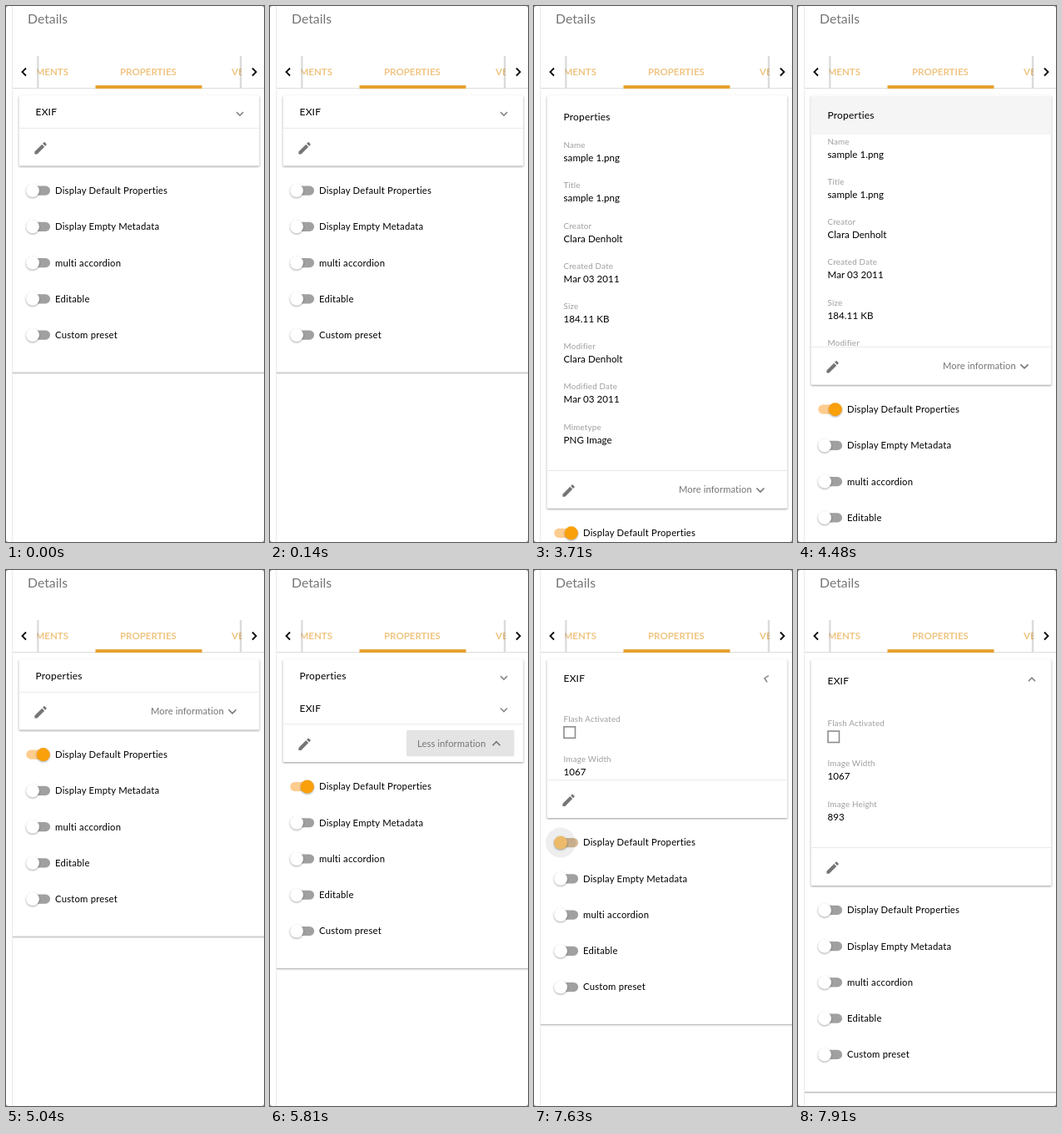
An HTML page for the animation above (8000 ms loop, 310 px wide and 642 px high).

```html
<!DOCTYPE html>
<html lang="en">
<head>
<meta charset="utf-8">
<title>Details panel</title>
<style>
  html, body { margin: 0; height: 100%; overflow: hidden; background: #8a8a8a; }
  svg { display: block; }
  text { font: 11.3px Lato, sans-serif; letter-spacing: .2px; fill: #000; }
  .title { font-size: 15.8px; letter-spacing: 0; fill: #757575; }
  .tab { font-weight: 700; font-size: 11.5px; letter-spacing: 0; fill: #f0c583; }
  .header { font-size: 12px; }
  .label { font-size: 9.8px; fill: #9e9e9e; }
  .value { font-size: 11.6px; letter-spacing: .05px; }
  .info { font-size: 11.2px; letter-spacing: .1px; fill: #757575; }
  .line { fill: none; stroke: #757575; stroke-width: 1.6; }
  .card { fill: #fff; filter: drop-shadow(0 1px 1.2px rgba(0,0,0,.4)); }
  .thumb { filter: drop-shadow(0 1px 1px rgba(0,0,0,.35)); }
</style>
</head>
<body>
<svg width="310" height="642" viewBox="0 0 310 642">
  <defs>
    <linearGradient id="shade"><stop stop-opacity=".22"/><stop offset="1" stop-opacity="0"/></linearGradient>
  </defs>
  <rect width="310" height="642" rx="3" fill="#fff"/>
  <path d="M7.5 0V642" stroke="#ebebeb"/>
  <text class="title" x="26" y="21">Details</text>
  <text class="tab" x="75" y="83" text-anchor="end">COMMENTS</text>
  <text class="tab" x="137" y="83">PROPERTIES</text>
  <text class="tab" x="271" y="83">VERSIONS</text>
  <rect x="8" y="60" width="29.5" height="38" fill="#fff"/>
  <rect x="283" y="60" width="27" height="38" fill="#fff"/>
  <rect x="37.5" y="60" width="3" height="38" fill="url(#shade)"/>
  <rect x="-283" y="60" width="3" height="38" fill="url(#shade)" transform="scale(-1 1)"/>
  <path d="M8 98.5H310" stroke="#dcdcdc"/>
  <rect x="107.5" y="95" width="128" height="4" fill="#e6a131"/>
  <path d="M24 74.5L19.5 79L24 83.5M296 74.5L300.5 79L296 83.5" fill="none" stroke="#000" stroke-width="1.8"/>
  <g id="scene"></g>
</svg>
<script>
const LOOP = 8000, STEP = 70, EXPAND = 225;
const TOGGLE_ON = 2845, COLLAPSE = 4413, MORE = 5740, TOGGLE_OFF = 7545;
const CARD_TOP = 107.9, HEADER = 38.4, HEADER_GROWTH = 12, ROW = 48.2;
const PENCIL = 'M3 17.25V21h3.75L17.81 9.94l-3.75-3.75zM20.71 7.04a1 1 0 0 0 0-1.41l-2.34-2.34a1 1 0 0 0-1.41 0l-1.83 1.83 3.75 3.75z';

const properties = [
  ['Name', 'sample 1.png'], ['Title', 'sample 1.png'], ['Creator', 'Clara Denholt'],
  ['Created Date', 'Mar 03 2011'], ['Size', '184.11 KB'], ['Modifier', 'Clara Denholt'],
  ['Modified Date', 'Mar 03 2011'], ['Mimetype', 'PNG Image']
];
const exif = [['Flash Activated', null], ['Image Width', '1067'], ['Image Height', '893']];
const options = ['Display Default Properties', 'Display Empty Metadata', 'multi accordion', 'Editable', 'Custom preset'];

const clamp = x => Math.min(1, Math.max(0, x));
const ramp = (t, start, length) => clamp((t - start) / length);
const mix = (a, b, k) => `rgb(${a.map((v, i) => Math.round(v + (b[i] - v) * k))})`;
const text = (kind, x, y, s) => `<text class="${kind}" x="${x}" y="${y}">${s}</text>`;

// cubic-bezier(.4, 0, .2, 1)
function ease(x) {
  let lo = 0, hi = 1;
  for (let i = 0; i < 20; i++) {
    const u = (lo + hi) / 2, v = 1 - u;
    if (1.2 * v * v * u + .6 * v * u * u + u ** 3 < x) lo = u; else hi = u;
  }
  return 3 * (1 - lo) * lo * lo + lo ** 3;
}
const expand = (t, start) => ease(ramp(t, start, EXPAND));

function field([label, value], y) {
  return text('label', 35.5, y + 3.3, label) + (value === null
    ? `<rect class="line" x="36" y="${y + 9}" width="13.5" height="13.5" style="stroke:#8c8c8c"/>`
    : text('value', 35.5, y + 19.3, value));
}

function panel({ title, rows, firstRow, open, hover, chevron }, y) {
  const header = HEADER + HEADER_GROWTH * open;
  const body = (firstRow + ROW * (rows.length - 1) + 52.2) * open;
  const middle = y + header / 2;
  let out = hover ? `<rect x="15.5" y="${y}" width="289" height="${header}" fill="#f5f5f5"/>` : '';
  out += text('header', 35.5, middle + 4, title);
  if (chevron) out += `<path class="line" style="stroke:#888" d="M-4 0L0 4L4 0" transform="translate(281 ${middle}) rotate(${180 * open})"/>`;
  if (open) out += `<svg y="${y + header}" width="310" height="${body}">${rows.map((r, i) => field(r, firstRow + ROW * i)).join('')}</svg>`;
  return { out, bottom: y + header + body };
}

function infoButton(t, y, more) {
  const left = more ? 164 : 161, width = 293.5 - left;
  const hover = t >= 5460 && t < 6230 ? .05 : 0;
  const grow = ramp(t, 5640, 220), fade = .06 * (1 - ramp(t, 5870, 200));
  let out = `<rect x="${left}" y="${y + 7}" width="${width}" height="31.5" rx="2" fill-opacity="${hover}"/>`;
  if (grow && fade) out += `<svg x="${left}" y="${y + 7}" width="${width}" height="31.5"><circle cx="65" cy="16" r="${90 * grow}" fill-opacity="${fade}"/></svg>`;
  const c = y + 23;
  return out + text('info', more ? 177 : 174, c + 3.8, more ? 'Less information' : 'More information')
    + `<path class="line" d="${more ? `M267.5 ${c + 2.5}l4.5 -4.5 4.5 4.5` : `M267.5 ${c - 2}l4.5 4.5 4.5 -4.5`}"/>`;
}

function toggle(y, label, shift, tint) {
  return `<rect x="24.3" y="${y - 5.6}" width="28.8" height="11.2" rx="5.6" fill="${mix([160, 160, 160], [253, 204, 143], tint)}"/>
    <circle class="thumb" cx="${32 + 12.8 * shift}" cy="${y}" r="8" fill="${mix([255, 255, 255], [250, 160, 10], tint)}"/>`
    + text('', 59, y + 3.9, label);
}

function toggleRipple(t, press, x, y, on) {
  const fade = 1 - ramp(t, press + 230, 210);
  if (t < press || !fade) return '';
  return `<circle cx="${x}" cy="${y}" r="${18 * ramp(t, press, 120)}" fill="${on ? '#faa00a' : '#000'}" fill-opacity="${.065 * fade}"/>`;
}

function scene(t) {
  const on = t >= TOGGLE_ON && t < TOGGLE_OFF;
  const more = on && t >= MORE;
  const main = {
    title: 'Properties', rows: properties, firstRow: 8.6, chevron: more,
    open: expand(t, TOGGLE_ON) - expand(t, COLLAPSE), hover: t >= 4410 && t < 4900
  };
  const extra = { title: 'EXIF', rows: exif, firstRow: 25.7, chevron: true, open: expand(t, TOGGLE_OFF) };
  const panels = on ? (more ? [main, extra] : [main]) : [extra];

  let bar = CARD_TOP, content = '';
  for (const p of panels) {
    const drawn = panel(p, bar);
    content += drawn.out;
    bar = drawn.bottom;
  }
  const bottom = bar + 45.3, first = bottom + 29.5, end = bottom + 247;
  const shift = ramp(t, TOGGLE_ON, 80) - ramp(t, TOGGLE_OFF, 80);
  const tint = ramp(t, TOGGLE_ON, 200) - ramp(t, TOGGLE_OFF, 200);

  return `<rect x="8" y="${end}" width="302" height="1.2" fill="#bdbdbd"/>
    <rect x="8" y="${end + 1.2}" width="302" height="1.2" fill="#e6e6e6"/>
    <rect class="card" x="15.5" y="107" width="289" height="${bottom - 107}" rx="1.5"/>${content}
    <path d="M16 ${bar}H304" stroke="#e8e8e8"/>
    <path d="${PENCIL}" fill="#757575" transform="translate(32 ${bar + 14.4}) scale(.8)"/>`
    + (on ? infoButton(t, bar, more) : '')
    + options.map((label, i) => toggle(first + 43.25 * i, label, i ? 0 : shift, i ? 0 : tint)).join('')
    + [2760, 7450].map(press => toggleRipple(t, press, 32 + 12.8 * shift, first, on)).join('');
}

const stage = document.getElementById('scene');
const origin = performance.now();
function frame() {
  const t = (performance.now() - origin) % LOOP;
  stage.innerHTML = scene(Math.floor(t / STEP) * STEP);
  requestAnimationFrame(frame);
}
frame();
</script>
</body>
</html>
```
